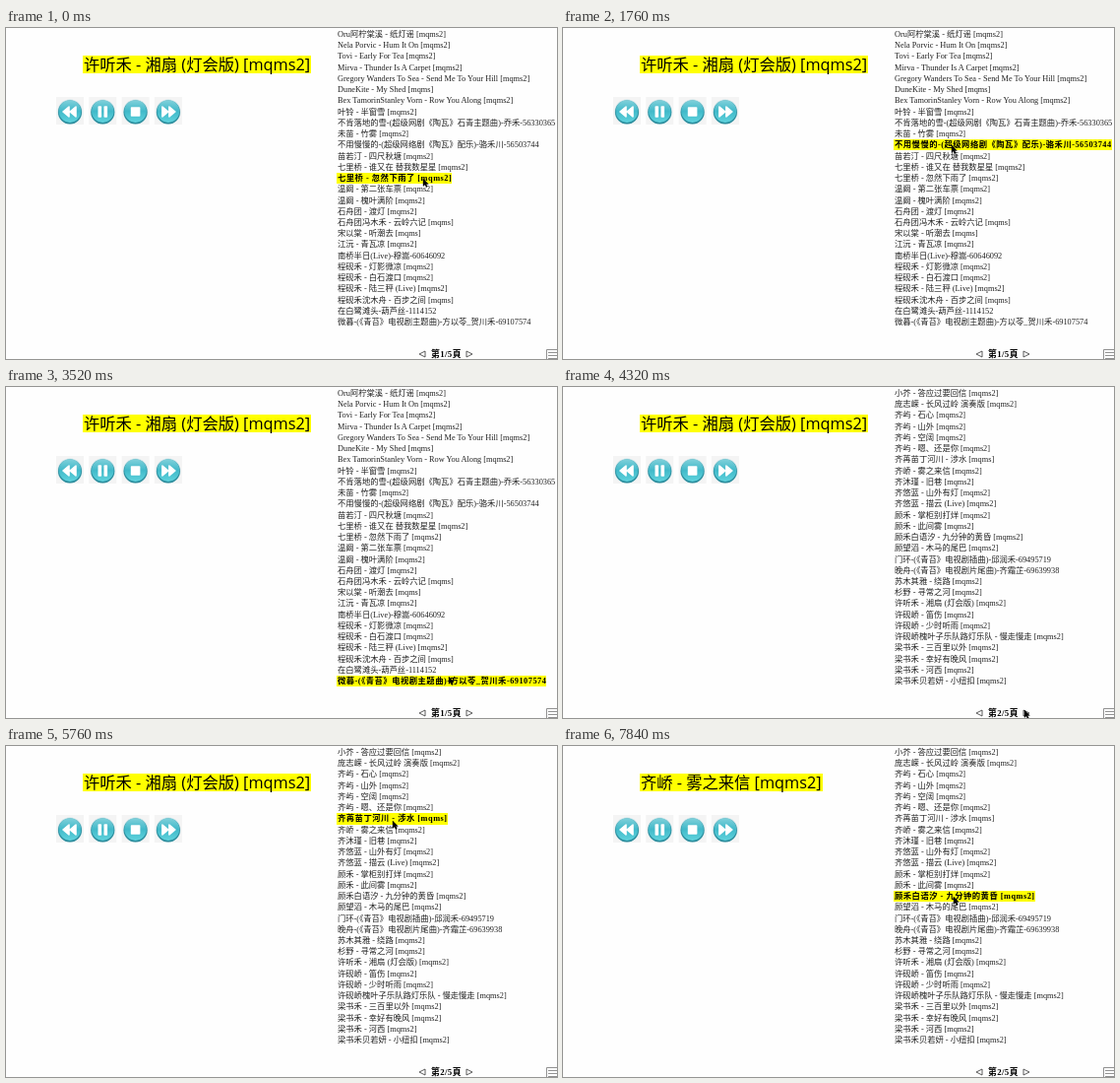
Write an HTML page that moves like this. It is 560 px wide and 336 px high and loops after 8 s.

```html
<!DOCTYPE html>
<html lang="zh-CN">
<head>
<meta charset="utf-8">
<title>Song list</title>
<style>
html, body { margin: 0; width: 560px; height: 336px; overflow: hidden; background: #fefefe; color: #000; }
body { position: relative; }
div, svg { position: absolute; white-space: pre; }
#title { left: 78px; top: 28px; height: 18px; padding: 0 1px; background: #ff0;
  font: 16.3px/18px "Open Sans", "Noto Sans CJK SC", "Noto Sans CJK", sans-serif; }
.row, #page { font: 8.3px/11.2px "Liberation Serif", "Noto Sans CJK SC", "Noto Sans CJK", serif; }
.row { left: 336px; height: 11.2px; padding-left: 1px; color: #222; }
.row.on { background: #ff0; color: #000; font-weight: bold; letter-spacing: .5px; }
#page { left: 432px; top: 325.5px; font-weight: bold; font-size: 8.8px; letter-spacing: .4px; }
svg { left: 0; top: 0; }
</style>
</head>
<body>
<div id="title"></div>
<div id="list"></div>
<div id="page"></div>
<svg width="560" height="336">
  <defs>
    <linearGradient id="teal" x2="0" y2="1">
      <stop stop-color="#7fd0da"/><stop offset=".5" stop-color="#41b9c9"/><stop offset="1" stop-color="#5fd3dd"/>
    </linearGradient>
    <g id="disc">
      <rect x="-14" y="-15" width="28" height="28" fill="#f4f4f4"/>
      <circle r="12.6" fill="#c9e3e8"/>
      <circle cy=".6" r="12" fill="#2b8c9c"/>
      <circle cy="-.4" r="11.3" fill="url(#teal)"/>
    </g>
  </defs>
  <g id="buttons" fill="#fff" stroke-linejoin="round"></g>
  <g fill="#fff" stroke="#333" stroke-width=".8">
    <path d="M426 328v6l-6-3zM468 328v6l6-3z"/>
    <path d="M549.5 326.5h12v12h-12zM551 329.5h9M551 332.5h9M551 335.5h9" stroke="#777"/>
  </g>
  <path id="cursor" d="M0 0v7.5l1.8-1.6 1.3 2.6 1.2-.6-1.3-2.5h2.3z" stroke="#000" stroke-width=".4"/>
</svg>
<script>
const $ = id => document.getElementById(id);
const LOOP = 8000, STEP = 160, PITCH = 11.24, TOP = .9;
const FLIP = 4160, PICK = 6240;

const pages = [`Oru阿柠棠溪 - 纸灯谣
Nela Porvic - Hum It On
Tovi - Early For Tea
Mirva - Thunder Is A Carpet
Gregory Wanders To Sea - Send Me To Your Hill
DuneKite - My Shed [mqms]
Bex TamorinStanley Vorn - Row You Along
叶铃 - 半窗雪
不肯落地的雪-(超级网剧《陶瓦》石青主题曲)-乔禾-56330365
未苗 - 竹雾
不用慢慢的-(超级网络剧《陶瓦》配乐)-骆禾川-56503744
苗若汀 - 四尺秋塘
七里桥 - 谁又在 替我数星星
七里桥 - 忽然下雨了
温阚 - 第二张车票
温阚 - 槐叶满阶
石舟团 - 渡灯
石舟团冯木禾 - 云岭六记 [mqms]
宋以棠 - 听潮去 [mqms]
江沅 - 青瓦凉
南桥半日(Live)-穆嵩-60646092
程砚禾 - 灯影微凉
程砚禾 - 白石渡口
程砚禾 - 陆三秤 (Live)
程砚禾沈木舟 - 百步之间 [mqms]
在白鹭滩头-葫芦丝-1114152
微暮-(《青苔》电视剧主题曲)-方以苓_贺川禾-69107574`,
`小芥 - 答应过要回信
庞志嵘 - 长风过岭 演奏版
齐屿 - 石心
齐屿 - 山外
齐屿 - 空阔
齐屿 - 嗯、还是你
齐苒苗丁河川 - 涉水 [mqms]
齐峤 - 雾之来信
齐沐瑾 - 旧巷
齐悠蓝 - 山外有灯
齐悠蓝 - 描云 (Live)
顾禾 - 掌柜别打烊
顾禾 - 此间雾
顾禾白语汐 - 九分钟的黄昏
顾望滔 - 木马的尾巴
门环-(《青苔》电视剧插曲)-邱润禾-69495719
晚舟-(《青苔》电视剧片尾曲)-齐霜芷-69639938
苏木其雅 - 绕路
杉野 - 寻常之河
许听禾 - 湘扇 (灯会版)
许砚峤 - 笛伤
许砚峤 - 少时听雨
许砚峤槐叶子乐队路灯乐队 - 慢走慢走
梁书禾 - 三百里以外
梁书禾 - 幸好有晚风
梁书禾 - 河西
梁书禾贝若妍 - 小纽扣`].map(text => text.split("\n").map(s => /[\d\]]$/.test(s) ? s : s + " [mqms2]"));

// Pointer path: time, x, y
const path = [
  [0, 424, 153], [320, 405, 117], [800, 391, 30], [960, 390, 32], [1760, 395, 119],
  [2240, 402, 141], [3360, 440, 264], [3520, 450, 294], [3680, 460, 308], [4000, 469, 328],
  [4640, 469, 328], [4800, 440, 290], [4960, 414, 238], [5600, 395, 84], [5760, 393, 76],
  [5920, 395, 88], [6880, 395, 88], [7840, 397, 153], [LOOP, 397, 153]
];

const icons = [
  "M-1 -5v10l-6-5zM6 -5v10l-6-5z",
  "M-4 -5h2v10h-2zM2 -5h2v10h-2z",
  "M-4 -4h8v8h-8z",
  "M1 -5v10l6-5zM-6 -5v10l6-5z"
];
$("buttons").innerHTML = icons.map((d, i) =>
  `<g transform="translate(${65 + i * 33.3} 85)"><use href="#disc"/><path d="${d}" stroke="#fff" stroke-width="1.6"/></g>`).join("");

const rows = pages[0].map((_, i) => {
  const row = document.createElement("div");
  row.style.top = TOP + i * PITCH + "px";
  $("list").append(row);
  return row;
});

function pointer(t) {
  const i = path.findIndex(p => p[0] > t);
  const [t0, x0, y0] = path[i - 1], [t1, x1, y1] = path[i];
  const k = (t - t0) / (t1 - t0);
  return [x0 + (x1 - x0) * k, y0 + (y1 - y0) * k];
}

function draw(now) {
  const t = Math.floor(now % LOOP / STEP) * STEP;
  const [x, y] = pointer(t);
  const page = t < FLIP ? 0 : 1;
  const hover = Math.floor((y - TOP) / PITCH);
  rows.forEach((row, i) => {
    row.textContent = pages[page][i];
    row.className = i === hover ? "row on" : "row";
  });
  $("title").textContent = pages[1][t < PICK ? 19 : 7];
  $("page").textContent = `第${page + 1}/5頁`;
  $("cursor").setAttribute("transform", `translate(${x} ${y})`);
}

const start = performance.now();
function tick() {
  draw(performance.now() - start);
  requestAnimationFrame(tick);
}
tick();
</script>
</body>
</html>
```
